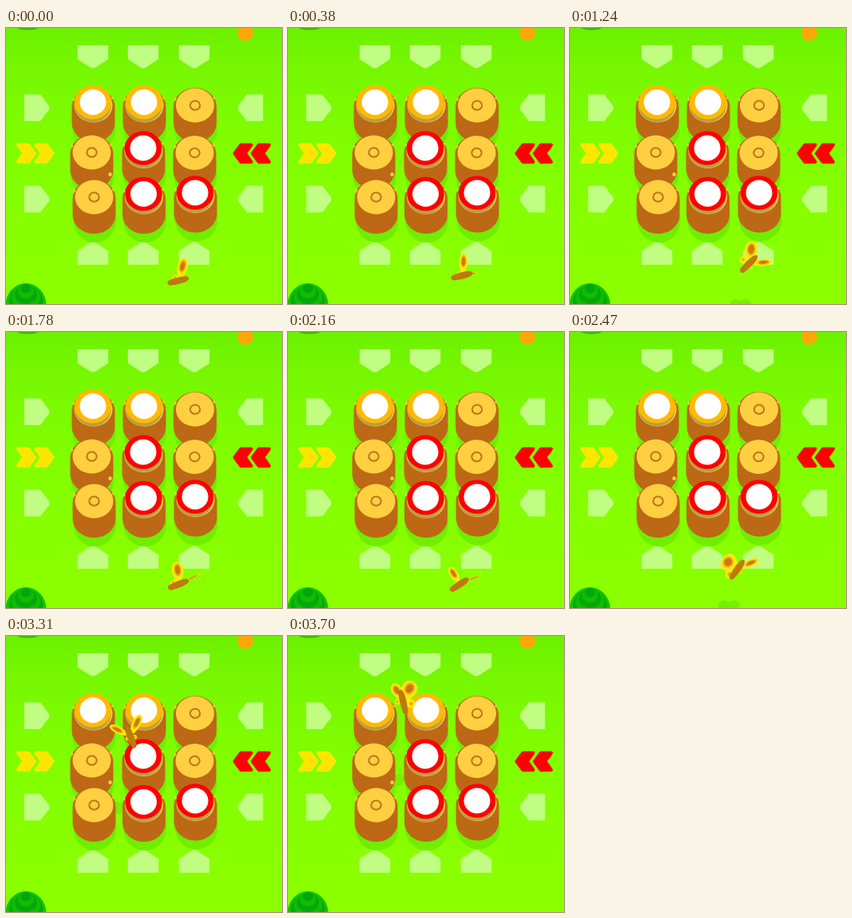
These frames come from a looping animation (346x346 px, 3.77 s). An HTML page:

```html
<!DOCTYPE html>
<html lang="en">
<head>
<meta charset="utf-8">
<title>Butterfly over the logs</title>
<style>
html, body { margin: 0; width: 100%; height: 100%; overflow: hidden; background: #85ff00; }
svg { display: block; width: 100vw; height: 100vh; }
</style>
</head>
<body>
<svg viewBox="0 0 346 346">
  <defs>
    <linearGradient id="grass" x1="0" y1="0" x2="0" y2="1">
      <stop offset="0" stop-color="#6cf000"/>
      <stop offset=".14" stop-color="#76f700"/>
      <stop offset=".36" stop-color="#7efc00"/>
      <stop offset=".6" stop-color="#85ff00"/>
      <stop offset="1" stop-color="#8cff00"/>
    </linearGradient>
    <g id="wing">
      <path d="M0 0C-6 -4 -14 -12 -13 -20.5C-12 -34 12 -34 13 -20.5C14 -12 6 -4 0 0Z" fill="#ffe90a"/>
      <ellipse cy="-19.5" rx="8.8" ry="8.8" fill="#f4b414"/>
      <ellipse cy="-19.5" rx="5.8" ry="6.4" fill="#c87a12"/>
    </g>
    <g id="lobe">
      <path d="M0 0C-5 -4 -8 -11 -7 -15C-6 -23 6 -23 7 -15C8 -11 5 -4 0 0Z" fill="#ffe90a"/>
      <ellipse cy="-14.5" rx="2.8" ry="3" fill="#e8a814"/>
    </g>
  </defs>
  <rect width="346" height="346" fill="url(#grass)"/>
  <ellipse cx="27" cy="-1" rx="14" ry="3.5" fill="#48b400"/>
  <circle cx="300" cy="6" r="10" fill="#ffa60d"/>
  <g id="signs"></g>
  <g id="shades"></g>
  <g id="shadow" fill="#77ef00">
    <ellipse cx="-5" rx="9" ry="7" transform="rotate(20)"/>
    <ellipse cx="5" rx="9" ry="7" transform="rotate(-20)"/>
  </g>
  <g id="logs"></g>
  <g id="bush">
    <ellipse cx="25" cy="347" rx="25.5" ry="27" fill="#14c400"/>
    <ellipse cx="25" cy="343" rx="21.5" ry="20" fill="#06aa06"/>
    <ellipse cx="25" cy="338" rx="18" ry="16" fill="#10bd04"/>
    <ellipse cx="25" cy="334" rx="14" ry="12" fill="#06aa06"/>
    <ellipse cx="25" cy="330" rx="10" ry="9" fill="#10bd04"/>
    <ellipse cx="25" cy="326.5" rx="6.5" ry="6" fill="#04a80c"/>
  </g>
  <g id="fly">
    <use id="lobeL" href="#lobe"/><use id="lobeR" href="#lobe"/>
    <use id="wingL" href="#wing"/><use id="wingR" href="#wing"/>
    <path id="trunk" d="M0 -14C6 -13 5 4 3.5 14Q0 19 -3.5 14C-5 4 -6 -13 0 -14Z" fill="#bd7a0d"/>
  </g>
</svg>
<script>
const $ = id => document.getElementById(id);

function add(parent, tag, attrs) {
  const el = document.createElementNS('http://www.w3.org/2000/svg', tag);
  for (const k in attrs) el.setAttribute(k, attrs[k]);
  parent.appendChild(el);
  return el;
}
const ellipse = (g, cx, cy, rx, ry, fill) => add(g, 'ellipse', { cx, cy, rx, ry, fill });

// Pale slots around the board
function slot(x, y, turn) {
  const tall = turn % 180 === 0;
  const w = tall ? 19 : 16.5, tip = tall ? 14 : 15.5;
  add($('signs'), 'path', {
    d: `M${-w} ${-tip}H${w}V${tip - 11}L2 ${tip}H-2L${-w} ${tip - 11}Z`,
    transform: `translate(${x} ${y}) rotate(${turn})`, fill: '#c0fd82',
    stroke: '#c0fd82', 'stroke-width': .5, 'stroke-linejoin': 'round'
  });
}
for (const x of [109, 172, 236]) { slot(x, 36, 0); slot(x, 282.5, 180); }
for (const y of [100, 214.5]) { slot(38.5, y, -90); slot(306.5, y, 90); }

function chevrons(transform, fill) {
  const g = add($('signs'), 'g', { transform, fill, stroke: fill, 'stroke-width': 4, 'stroke-linejoin': 'round' });
  for (const x of [0, 22.5]) add(g, 'path', { d: `M${15 + x} 146.5H${28 + x}L${36 + x} 157.2L${28 + x} 168H${15 + x}L${22.5 + x} 157.2Z` });
}
chevrons('', '#ffe600');
chevrons('translate(345 0) scale(-1 1)', '#ff0000');

function log(x, y, token) {
  const g = $('logs');
  ellipse($('shades'), x + 1, y + 30, 27, 27, '#70ee00');
  add(g, 'path', { d: `M${x - 27} ${y + 2}A27 24 0 0 1 ${x + 27} ${y + 2}V${y + 22}A27 24 0 0 1 ${x - 27} ${y + 22}Z`, fill: '#bd6815' });
  add(g, 'path', { d: `M${x - 23} ${y - 8}l-3 -2 1 5ZM${x + 22} ${y - 10}l3 -1 -1 4Z`, fill: '#ffcd42' });
  ellipse(g, x, y, 24, 21.5, '#ffcf42');
  if (!token) {
    add(g, 'ellipse', { cx: x, cy: y, rx: 6.2, ry: 5.8, fill: 'none', stroke: '#bd7416', 'stroke-width': 2 });
    return;
  }
  ellipse(g, x - .5, y + .5, 22.8, 20.5, '#b3a04a');
  ellipse(g, x - .5, y - 4, 23.2, 21.3, token);
  ellipse(g, x - .5, y - 4, 16.5, 16, '#fff');
}
const gold = '#ffba00', red = '#ff0000';
[[109.5, 97, gold], [173.5, 97, gold], [237, 97],
 [107.5, 156], [172.5, 154.5, red], [236.5, 156.5],
 [110.5, 212], [173, 212, red], [237.5, 210.5, red]].forEach(a => log(...a));
ellipse($('logs'), 130.5, 183.5, 2.2, 2.5, '#ffcd42');

// time, x, y, body angle, left wing angle/width/length, right wing angle/width/length, shadow drop
const poses = [
  [0,    217, 316.5, 76,  14, .48, .95,  70, .04, .3,  55],
  [720,  222, 302,   72,  -8, .72, .85,  90, .24, 1.0, 55],
  [1240, 225, 295,   45,   7, .62, .9,   86, .34, .9,  54],
  [1780, 217, 316,   68,  -7, .55, .92,  64, .1,  1.0, 50],
  [2470, 210, 296,   35, -56, .85, .75,  66, .36, .92, 49],
  [2930, 171, 178,  -20, -87, .95, 1,    30, .95, 1,   80],
  [3700, 144, 81,   -13, -30, .5, .8,    28, .75, .9, 101]
];
const LOOP = 3770, STEP = 77;

// Smooth curve through the poses, with extra wing beats in between
function poseAt(t) {
  const last = poses.length - 1;
  let i = 0;
  while (i < last - 1 && t >= poses[i + 1][0]) i++;
  const a = poses[Math.max(0, i - 1)], b = poses[i], c = poses[i + 1], d = poses[Math.min(last, i + 2)];
  const span = c[0] - b[0], u = Math.min(1, (t - b[0]) / span);
  const p = b.map((v, k) => {
    const m = (c[k] - a[k]) / (c[0] - a[0]) * span, n = (d[k] - v) / (d[0] - b[0]) * span;
    const u2 = u * u, u3 = u2 * u;
    return (2 * u3 - 3 * u2 + 1) * v + (u3 - 2 * u2 + u) * m + (3 * u2 - 2 * u3) * c[k] + (u3 - u2) * n;
  });
  const beat = 1 - .55 * Math.sin(Math.PI * u * Math.round(span / 260)) ** 2;
  p[5] = Math.max(.05, p[5] * beat);
  p[8] = Math.max(.04, p[8] * beat);
  return p;
}

const turn = (id, angle, w, l) => $(id).setAttribute('transform', `rotate(${angle}) scale(${w} ${l})`);

function draw(t) {
  const [, x, y, body, la, lw, ll, ra, rw, rl, drop] = poseAt(Math.round(t / STEP - .45) * STEP);
  $('fly').setAttribute('transform', `translate(${x} ${y})`);
  turn('trunk', body, .9, .9 + .2 * Math.min(1, rw));
  turn('wingL', la, lw, ll);
  turn('wingR', ra, rw, rl);
  turn('lobeL', la - 68, lw, lw);
  turn('lobeR', ra + 80, rw, rw);
  $('shadow').setAttribute('transform', `translate(${x - 11} ${y + drop})`);
}

const start = performance.now();
function tick() {
  draw((performance.now() - start) % LOOP);
  requestAnimationFrame(tick);
}
tick();
</script>
</body>
</html>
```
